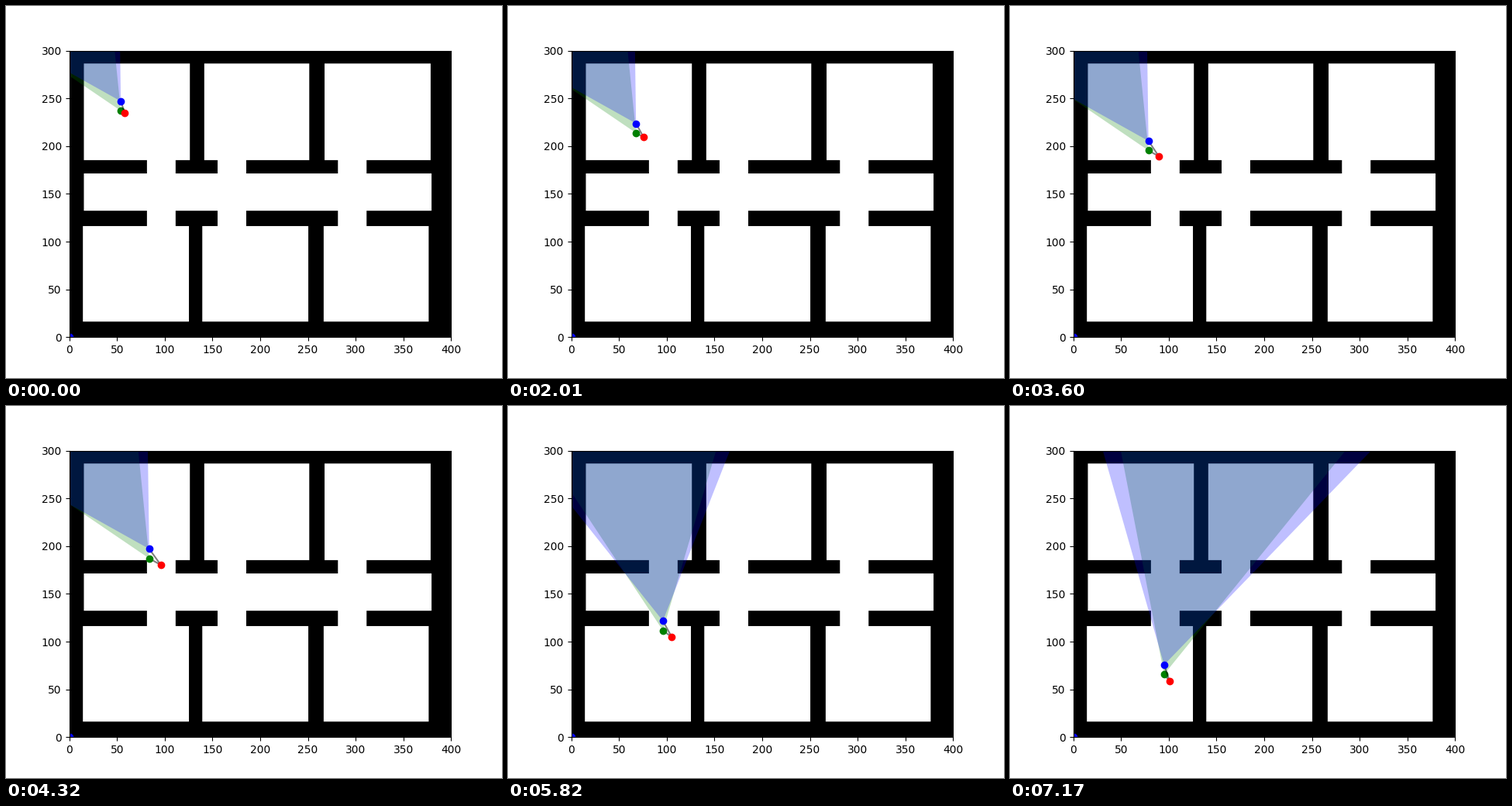
A matplotlib script that plays this animation: 640x480 px, repeating every 7200 ms.

```python
import numpy as np
import matplotlib.pyplot as plt
from matplotlib.animation import FuncAnimation
from matplotlib.patches import Polygon

W, H = 400, 300
FRAMES, INTERVAL = 240, 30

# Waypoints and the frames at which they are reached
KEYS = [0, 150, 210, 240]
EYE = np.array([(54, 237), (85, 185), (100, 85), (95, 65)], float)
TAIL = np.array([(58, 235), (97.5, 178), (108.2, 78), (100.7, 58)], float)
OFFSET = np.array([0, 10])


def floor_plan():
    """Black walls with white rooms, corridor and doorways."""
    plan = np.zeros((H, W))

    def clear(x0, x1, y0, y1):
        plan[y0:y1, x0:x1] = 1

    for x0, x1 in [(15, 126), (141, 251), (267, 378)]:
        clear(x0, x1, 185, 286)
    for x0, x1 in [(14, 125), (139, 250), (266, 376)]:
        clear(x0, x1, 16, 116)
    clear(15, 379, 132, 171)
    for x in (81, 155, 281):
        clear(x, x + 30, 116, 185)
    return plan


def along(points, i):
    return np.array([np.interp(i, KEYS, points[:, k]) for k in (0, 1)])


def heading(i):
    """View direction, facing back along the current leg."""
    leg = np.searchsorted(KEYS, i, side="right") - 1
    dx, dy = EYE[leg] - EYE[leg + 1]
    return np.arctan2(dy, dx)


def cone(apex, angle, fov, reach=1500):
    sides = angle + np.radians([-fov / 2, fov / 2])
    rim = apex + reach * np.column_stack([np.cos(sides), np.sin(sides)])
    return np.vstack([apex, rim])


fig, ax = plt.subplots(figsize=(6.4, 4.8), dpi=100)
ax.imshow(floor_plan(), cmap="gray", origin="lower", extent=(0, W, 0, H))
ax.set_xlim(0, W)
ax.set_ylim(0, H)
ax.set_xticks(range(0, W + 1, 50))
ax.set_yticks(range(0, H + 1, 50))


def add_cone(color):
    return ax.add_patch(Polygon(np.zeros((3, 2)), fc=color, alpha=0.25, lw=0))


def add_dot(color):
    return ax.plot([0], [0], "o", color=color)[0]


def add_link():
    return ax.plot([], [], "k-", alpha=0.5)[0]


green_cone, blue_cone = add_cone("green"), add_cone("blue")
add_dot("blue")
green_link, green_dot = add_link(), add_dot("green")
blue_link, blue_dot = add_link(), add_dot("blue")
red_dot = add_dot("red")


def update(i):
    green, red = along(EYE, i), along(TAIL, i)
    blue = green + OFFSET
    angle = heading(i)
    green_cone.set_xy(cone(green, angle, 50))
    blue_cone.set_xy(cone(blue, angle, 60))
    for dot, pos in ((green_dot, green), (blue_dot, blue), (red_dot, red)):
        dot.set_data([pos[0]], [pos[1]])
    for link, pos in ((green_link, green), (blue_link, blue)):
        link.set_data([pos[0], red[0]], [pos[1], red[1]])
    return green_cone, blue_cone, green_link, green_dot, blue_link, blue_dot, red_dot


anim = FuncAnimation(fig, update, frames=FRAMES, interval=INTERVAL,
                     repeat=True, repeat_delay=0)
plt.show()
```
